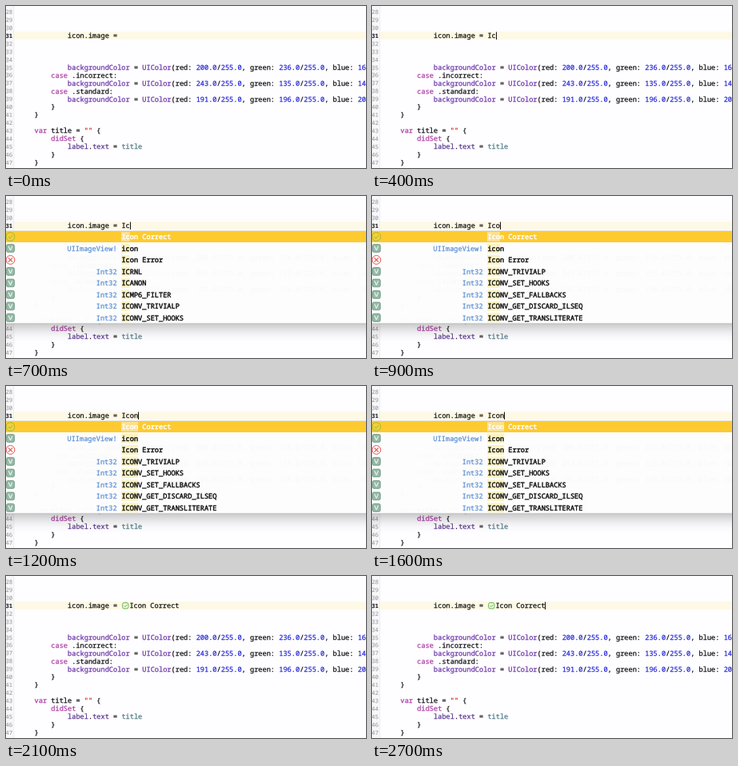
Recreate the animation shown at these times as an HTML page with a canvas. Size 450x203 px, loop 2.8 s.

```html
<!DOCTYPE html>
<html lang="en">
<head>
<meta charset="utf-8">
<title>Code completion</title>
<style>
html, body { margin: 0; width: 100%; height: 100%; overflow: hidden; background: #fff; }
canvas { display: block; }
</style>
</head>
<body>
<canvas id="stage" width="450" height="203"></canvas>
<script>
const ctx = document.getElementById('stage').getContext('2d');
const W = 450, H = 203, LOOP = 2800;
const CHAR = 5.18, LEFT = 14.9, LINE = 9.93;
const MONO = '"Noto Sans Mono", "DejaVu Sans Mono", monospace';
const CODE_FONT = `500 ${CHAR / 0.6}px ${MONO}`;
const MEDIUM = 0.25, SEMIBOLD = 0.45;
const BLACK = '#111113', KEYWORD = '#ad3da4', MEMBER = '#6b36a9', NUMBER = '#272ad8', STRING = '#d12f1b';
const PROPERTY = '#5a3a8e', PARAMETER = '#4f7c86';
const GREEN = '#62b64a', RED = '#e0504c';

const POPUP = { top: 43, bottom: 160, row: 14.5, first: 51 };
const FIRST_ROWS = [['', 'Icon Correct'], ['UIImageView!', 'icon'], ['', 'Icon Error']];
const ints = names => names.map(name => ['Int32', name]);
const SHORT_MATCHES = [...FIRST_ROWS, ...ints(['ICRNL', 'ICANON', 'ICMP6_FILTER', 'ICONV_TRIVIALP', 'ICONV_SET_HOOKS'])];
const LONG_MATCHES = [...FIRST_ROWS, ...ints(['ICONV_TRIVIALP', 'ICONV_SET_HOOKS', 'ICONV_SET_FALLBACKS',
  'ICONV_GET_DISCARD_ILSEQ', 'ICONV_GET_TRANSLITERATE'])];

const colX = col => LEFT + col * CHAR;
const baseline = line => 40.1 + (line - 31) * LINE;

// A thin outline of the given weight thickens the letters.
function text(str, x, y, color, { align = 'left', weight = MEDIUM } = {}) {
  ctx.textAlign = align;
  ctx.fillStyle = ctx.strokeStyle = color;
  ctx.fillText(str, x, y);
  ctx.lineWidth = weight;
  ctx.strokeText(str, x, y);
}

function rect(x, y, w, h, color) {
  ctx.fillStyle = color;
  ctx.fillRect(x, y, w, h);
}

// Draws [string, color] pairs one after another on the character grid.
function code(line, col, ...tokens) {
  for (const [str, color = BLACK] of tokens) {
    text(str, colX(col), baseline(line), color);
    col += str.length;
  }
}

function colorLine(line, red, green, blue) {
  const scaled = value => [[value + '.0', NUMBER], ['/'], ['255.0', NUMBER]];
  code(line, 12, ['backgroundColor', MEMBER], [' = '], ['UIColor', MEMBER], ['(red: '], ...scaled(red),
    [', green: '], ...scaled(green), [', blue: '], [String(blue), NUMBER]);
}

function stroke(color, width, ...points) {
  ctx.strokeStyle = color;
  ctx.lineWidth = width;
  ctx.beginPath();
  points.forEach(([x, y]) => ctx.lineTo(x, y));
  ctx.stroke();
}

function badge(x, y, r, corner, fill, border) {
  ctx.beginPath();
  ctx.roundRect(x - r, y - r, 2 * r, 2 * r, corner);
  ctx.fillStyle = fill;
  ctx.fill();
  ctx.strokeStyle = border;
  ctx.lineWidth = 1;
  ctx.stroke();
}

function checkIcon(x, y, r, corner, fill, color) {
  badge(x, y, r, corner, fill, color);
  stroke(color, 1, [x - r * 0.5, y], [x - r * 0.1, y + r * 0.4], [x + r * 0.55, y - r * 0.35]);
}

function crossIcon(x, y) {
  badge(x, y, 5.4, 5.4, '#fff', RED);
  stroke(RED, 1.1, [x - 2.6, y - 2.6], [x + 2.6, y + 2.6]);
  stroke(RED, 1.1, [x + 2.6, y - 2.6], [x - 2.6, y + 2.6]);
}

function variableIcon(x, y) {
  badge(x, y, 4.8, 1.5, '#98bba8', '#6f9a85');
  stroke('#fff', 1, [x - 2.3, y - 2.6], [x, y + 2.6], [x + 2.3, y - 2.6]);
}

function drawEditor() {
  rect(0, 0, W, H, '#fefdff');
  rect(0, 0, 10, H, '#f8f7f9');
  rect(9.5, 0, 0.7, H, '#e6e5e8');
  rect(10, 32, W - 10, 10, '#fdf9e6');

  for (let n = 28; n <= 47; n++) {
    const current = n === 31;
    ctx.font = `${current ? 600 : 400} 7.3px ${MONO}`;
    text(String(n), 8.2, baseline(n) - 0.3, current ? '#222' : '#a0a0a4', { align: 'right', weight: 0.1 });
  }

  ctx.font = CODE_FONT;
  code(31, 12, ['icon.image =']);
  colorLine(35, 200, 236, 165);
  code(36, 8, ['case', KEYWORD], [' .incorrect:']);
  colorLine(37, 243, 135, 140);
  code(38, 8, ['case', KEYWORD], [' .standard:']);
  colorLine(39, 191, 196, 200);
  code(40, 8, ['}']);
  code(41, 4, ['}']);
  code(43, 4, ['var', KEYWORD], [' title = '], ['""', STRING], [' {']);
  code(44, 8, ['didSet', KEYWORD], [' {']);
  code(45, 12, ['label', PROPERTY], ['.'], ['text', PROPERTY], [' = '], ['title', PARAMETER]);
  code(46, 8, ['}']);
  code(47, 4, ['}']);
}

function drawShadow(alpha) {
  ctx.save();
  ctx.beginPath();
  ctx.rect(0, POPUP.bottom, W, H);
  ctx.clip();
  ctx.globalAlpha = alpha;
  ctx.shadowColor = 'rgba(0,0,0,0.3)';
  ctx.shadowBlur = 18;
  ctx.shadowOffsetY = 4;
  rect(-30, POPUP.top, W + 60, POPUP.bottom - POPUP.top, '#fff');
  ctx.restore();
}

function drawPopup(rows, matched, alpha) {
  drawShadow(alpha);
  ctx.save();
  ctx.globalAlpha = alpha * 0.98;
  rect(0, POPUP.top, W, POPUP.bottom - POPUP.top, '#fdfdfd');
  ctx.globalAlpha = alpha;
  rect(0, POPUP.top, W, 1, '#e9e4d6');
  rect(0, POPUP.bottom - 0.5, W, 0.8, '#b4b4b4');
  rect(0, POPUP.top + 1, W, 14, '#fdca30');

  const x = colX(25);
  rows.forEach(([type, name], i) => {
    const y = POPUP.first + i * POPUP.row;
    const selected = i === 0;
    rect(x - 0.4, y - 6, matched * CHAR + 0.4, 12, selected ? '#fde08c' : '#fbf3c2');
    text(type, x - 5.8, y + 3, '#5b8fd2', { align: 'right' });
    text(name, x, y + 3, selected ? '#fff' : BLACK, { weight: SEMIBOLD });
    if (selected) checkIcon(5.5, y, 5.2, 4.5, '#f0cf3c', '#a4b834');
    else if (i === 2) crossIcon(5.5, y);
    else variableIcon(5.5, y);
  });
  ctx.restore();
}

function drawCaret(x) {
  rect(Math.round(x), 32.5, 1, 9.5, '#111');
}

function draw(t) {
  drawEditor();
  if (t >= 2100) {
    checkIcon(149.3, 37.2, 3.7, 2.2, '#f1f7df', GREEN);
    text('Icon Correct', 154.4, baseline(31), BLACK);
    if (t >= 2300) drawCaret(215.8);
    return;
  }
  const typed = [200, 400, 800, 1000].filter(at => t >= at).length;
  if (!typed) return;
  code(31, 25, ['Icon'.slice(0, typed)]);
  drawCaret(colX(25 + typed) - 0.1);
  if (t >= 600) drawPopup(typed > 2 ? LONG_MATCHES : SHORT_MATCHES, typed, t < 700 ? 0.75 : 1);
}

ctx.textRendering = 'geometricPrecision';
ctx.lineJoin = 'round';
const start = performance.now();
function tick() {
  draw((performance.now() - start) % LOOP);
  requestAnimationFrame(tick);
}
tick();
</script>
</body>
</html>
```
